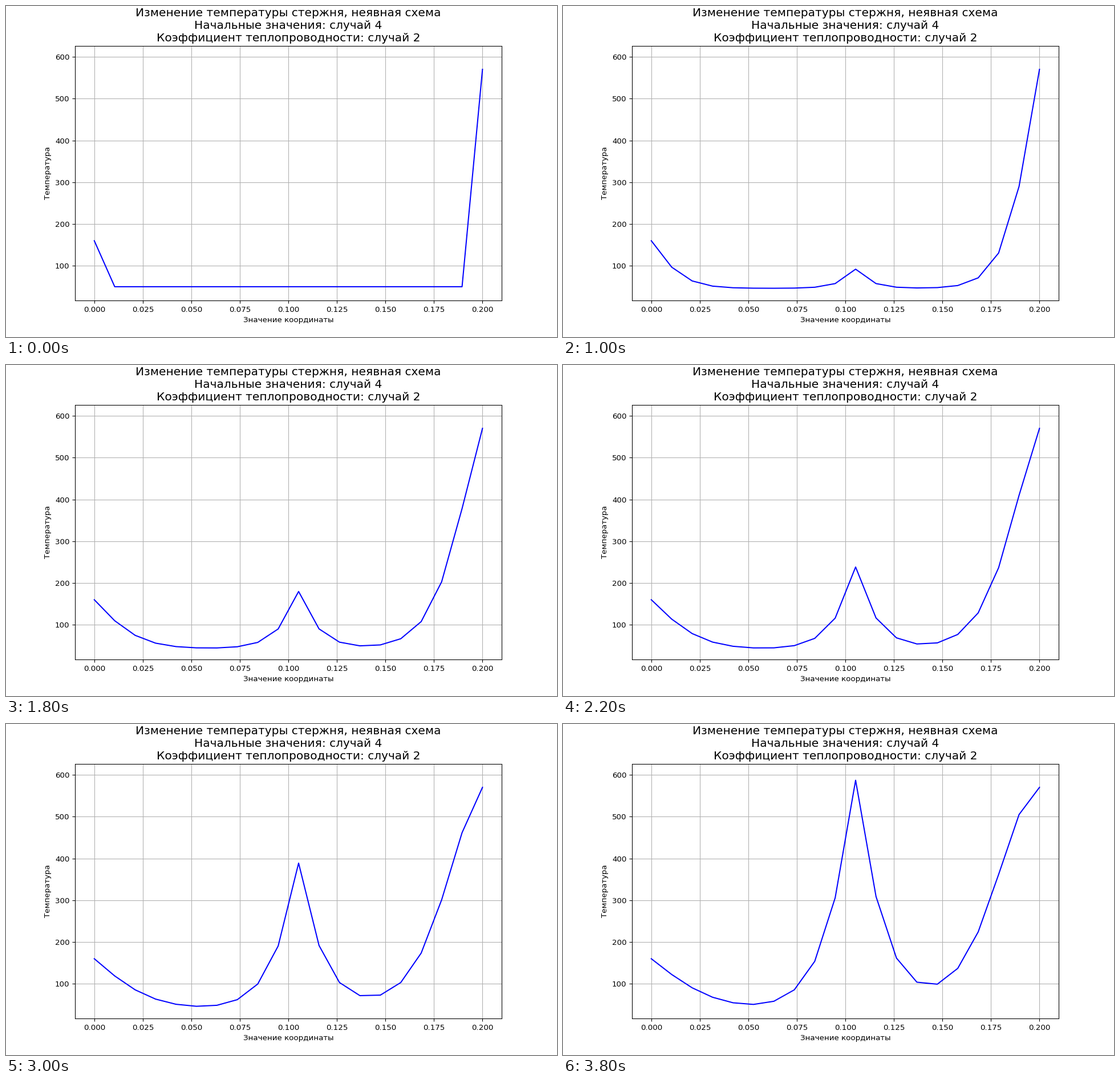
A matplotlib script for the animation above (4 s loop, 966x580 px).

```python
import numpy as np
import matplotlib.pyplot as plt
from matplotlib.animation import FuncAnimation

FRAMES, INTERVAL = 20, 200
NODES, MIDDLE = 20, 10
START, LEFT, RIGHT = 50.0, 160.0, 570.0

DIFFUSION = 0.195        # dimensionless step of the implicit scheme
COOLING = 0.8            # heat lost per step
HEATER = 7.5             # growth of the point source per step
SCALE = 0.966            # size of text and lines

plt.rcParams["font.family"] = "DejaVu Sans"
for key in ("font.size", "lines.linewidth", "axes.linewidth", "grid.linewidth",
            "axes.titlepad", "axes.labelpad",
            "xtick.major.size", "xtick.major.width", "xtick.major.pad",
            "ytick.major.size", "ytick.major.width", "ytick.major.pad"):
    plt.rcParams[key] *= SCALE


def heat_release(temp):
    """Nearly zero in the cold rod, linear in temperature when hot."""
    return 1.975 * np.logaddexp(0, (temp - 160) / 25) - COOLING


def implicit_matrix():
    a = ((1 + 2 * DIFFUSION) * np.eye(NODES)
         - DIFFUSION * (np.eye(NODES, k=1) + np.eye(NODES, k=-1)))
    a[[0, -1]] = np.eye(NODES)[[0, -1]]
    return a


def solve():
    """Temperature profiles of the rod, one per time step."""
    matrix = implicit_matrix()
    temp = np.full(NODES, START)
    temp[0], temp[-1] = LEFT, RIGHT
    history = [temp]
    for step in range(FRAMES - 1):
        rhs = temp + heat_release(temp)
        rhs[MIDDLE] += HEATER * step
        rhs[0], rhs[-1] = LEFT, RIGHT
        temp = np.linalg.solve(matrix, rhs)
        history.append(temp)
    return history


profiles = solve()

fig, ax = plt.subplots(figsize=(9.66, 5.8), dpi=100)
line, = ax.plot(np.linspace(0, 0.2, NODES), profiles[0], color="blue")
ax.set_xlim(-0.01, 0.21)
ax.set_ylim(16.8, 626.5)
ax.grid(True)
ax.set_title("Изменение температуры стержня, неявная схема\n"
             "Начальные значения: случай 4\n"
             "Коэффициент теплопроводности: случай 2", fontsize=15 * SCALE)
ax.set_xlabel("Значение координаты")
ax.set_ylabel("Температура")


def update(i):
    line.set_ydata(profiles[i])
    return line,


anim = FuncAnimation(fig, update, frames=FRAMES, interval=INTERVAL,
                     repeat=True, repeat_delay=0)
plt.show()
```
